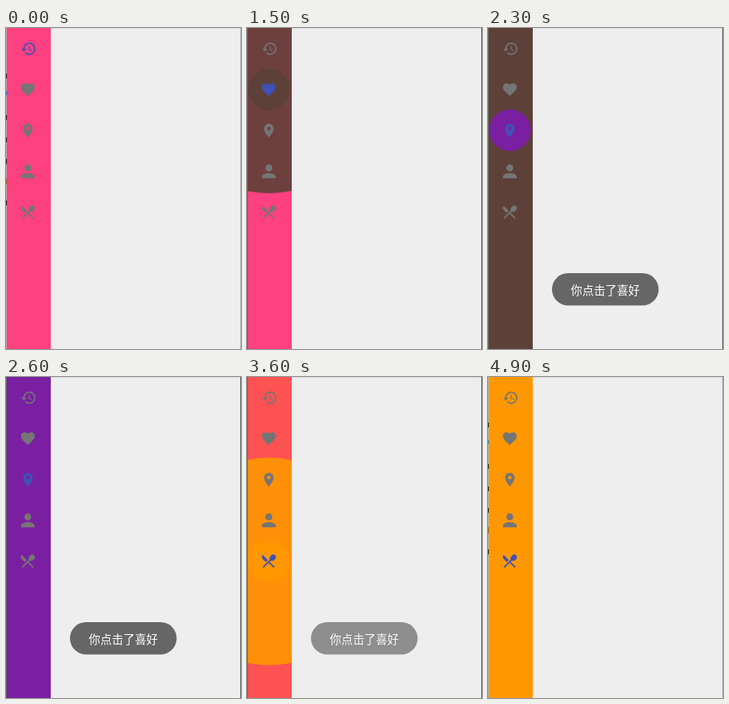
Recreate the animation shown at these times as an HTML page without scripts. Size 294x402 px, loop 5 s.

```html
<!DOCTYPE html>
<html lang="zh-CN">
<head>
<meta charset="utf-8">
<title>Side navigation</title>
<style>
html, body { margin: 0; width: 100%; height: 100%; overflow: hidden; background: #eee; }
svg { display: block; width: 294px; height: 402px; }

.wave, .tap, .icon, .toast, .blur { animation: 5s step-end infinite; }
.wave, .tap { r: 26px; opacity: 0; animation-delay: var(--t); }
.wave { animation-name: wave; }
.tap { animation-name: tap; }
.brown { --t: 1.4s; fill: #5d4037; }
.purple { --t: 2.3s; fill: #7b1fa2; }
.red { --t: 3.1s; fill: #ff5252; }
.orange { --t: 3.5s; fill: #ff9800; }

.icon { fill: #757575; }
.history { animation-name: history; }
.heart { animation-name: heart; }
.place { animation-name: place; }
.person { animation-name: person; }
.food { animation-name: food; }
.toast { opacity: 0; animation-name: toast; }
.toast text { font: 14.4px "Noto Sans CJK SC", "Noto Sans CJK", sans-serif; fill: #fff; }
.blur { animation-name: blur; }

/* 2% = 100 ms */
@keyframes wave {
  0% { r: 26px; opacity: .6; }
  2% { r: 130px; opacity: .9; }
  4% { r: 420px; opacity: .96; }
  6% { r: 420px; opacity: 1; }
  30%, 100% { r: 26px; opacity: 0; }
}
@keyframes tap { 0% { opacity: 1; } 6%, 100% { opacity: 0; } }
@keyframes history { 0% { fill: #3f51b5; } 28%, 100% { fill: #757575; } }
@keyframes heart { 28% { fill: #3f51b5; } 46%, 100% { fill: #757575; } }
@keyframes place { 46% { fill: #3f51b5; } 62%, 100% { fill: #757575; } }
@keyframes person { 62% { fill: #3f51b5; } 70%, 100% { fill: #757575; } }
@keyframes food { 70%, 100% { fill: #3f51b5; } }
@keyframes toast {
  0% { opacity: 0; }
  32% { opacity: .35; }
  34% { opacity: .75; }
  36% { opacity: 1; }
  72% { opacity: .7; }
  74% { opacity: .3; }
  76%, 100% { opacity: 0; }
}
@keyframes blur { 0% { opacity: 1; } 24% { opacity: 0; } 98%, 100% { opacity: 1; } }
</style>
</head>
<body>
<svg viewBox="0 0 294 402">
  <clipPath id="bar"><path d="M1 0H56V402H1z"/></clipPath>
  <rect width="294" height="402" fill="#eee"/>
  <path d="M56 0H294V1H56z" fill="#dcdcdc"/>

  <g clip-path="url(#bar)">
    <rect width="56" height="402" fill="#ff4081"/>
    <circle class="wave brown" cx="27.5" cy="77"/>
    <circle class="tap brown" cx="27.5" cy="77"/>
    <circle class="wave purple" cx="27.5" cy="128"/>
    <circle class="tap purple" cx="27.5" cy="128"/>
    <circle class="wave red" cx="27.5" cy="180"/>
    <circle class="tap red" cx="27.5" cy="180"/>
    <circle class="wave orange" cx="27.5" cy="231"/>
    <circle class="tap orange" cx="27.5" cy="231"/>
  </g>

  <path class="icon history" transform="translate(27.9 26) scale(.85) translate(-11.5 -12)" d="M13 3c-4.97 0-9 4.03-9 9H1l3.89 3.89.07.14L9 12H6c0-3.87 3.13-7 7-7s7 3.13 7 7-3.13 7-7 7c-1.93 0-3.68-.79-4.94-2.06l-1.42 1.42C8.27 19.99 10.51 21 13 21c4.97 0 9-4.03 9-9s-4.03-9-9-9zm-1 5v5l4.28 2.54.72-1.21-3.5-2.08V8H12z"/>
  <path class="icon heart" transform="translate(27.3 77.2) scale(.87) translate(-12 -12.2)" d="M12 21.35l-1.45-1.32C5.4 15.36 2 12.28 2 8.5 2 5.42 4.42 3 7.5 3c1.74 0 3.41.81 4.5 2.09C13.09 3.81 14.76 3 16.5 3 19.58 3 22 5.42 22 8.5c0 3.78-3.4 6.86-8.55 11.54z"/>
  <path class="icon place" transform="translate(27.3 128.5) scale(.86) translate(-12 -12)" d="M12 2C8.13 2 5 5.13 5 9c0 5.25 7 13 7 13s7-7.75 7-13c0-3.87-3.13-7-7-7zm0 9.5a2.5 2.5 0 1 1 0-5 2.5 2.5 0 0 1 0 5z"/>
  <path class="icon person" transform="translate(27.3 179.5) scale(1.08) translate(-12 -12)" d="M12 12c2.21 0 4-1.79 4-4s-1.79-4-4-4-4 1.79-4 4 1.79 4 4 4zm0 2c-2.67 0-8 1.34-8 4v2h16v-2c0-2.66-5.33-4-8-4z"/>
  <path class="icon food" transform="translate(27.3 230.7) scale(.92) translate(-12.2 -12.2)" d="M8.1 13.34l2.83-2.83L3.91 3.5c-1.56 1.56-1.56 4.09 0 5.66zm6.78-1.81c1.53.71 3.68.21 5.27-1.38 1.91-1.91 2.28-4.65.81-6.12-1.46-1.46-4.2-1.1-6.12.81-1.59 1.59-2.09 3.74-1.38 5.27L3.7 19.87l1.41 1.41L12 14.41l6.88 6.88 1.41-1.41L13.41 13z"/>

  <g class="toast">
    <rect x="80" y="307" width="133.5" height="40.5" rx="20.25" fill="#666"/>
    <text x="146.8" y="333.5" text-anchor="middle">你点击了喜好</text>
  </g>

  <path d="M0 0H1V402H0zM293 0H294V402H293z" fill="#5f6865"/>
  <g class="blur">
    <path d="M0 0H1V402H0zM293 0H294V402H293z" fill="#b0b0b0"/>
    <path d="M.5 57v6M.5 109v6M.5 137v6M.5 164v6M.5 216v6" stroke="#222"/>
    <path d="M.5 79v5" stroke="#2a7fd0"/>
    <path d="M.5 188v8" stroke="#8a6a20"/>
  </g>
</svg>
</body>
</html>
```
